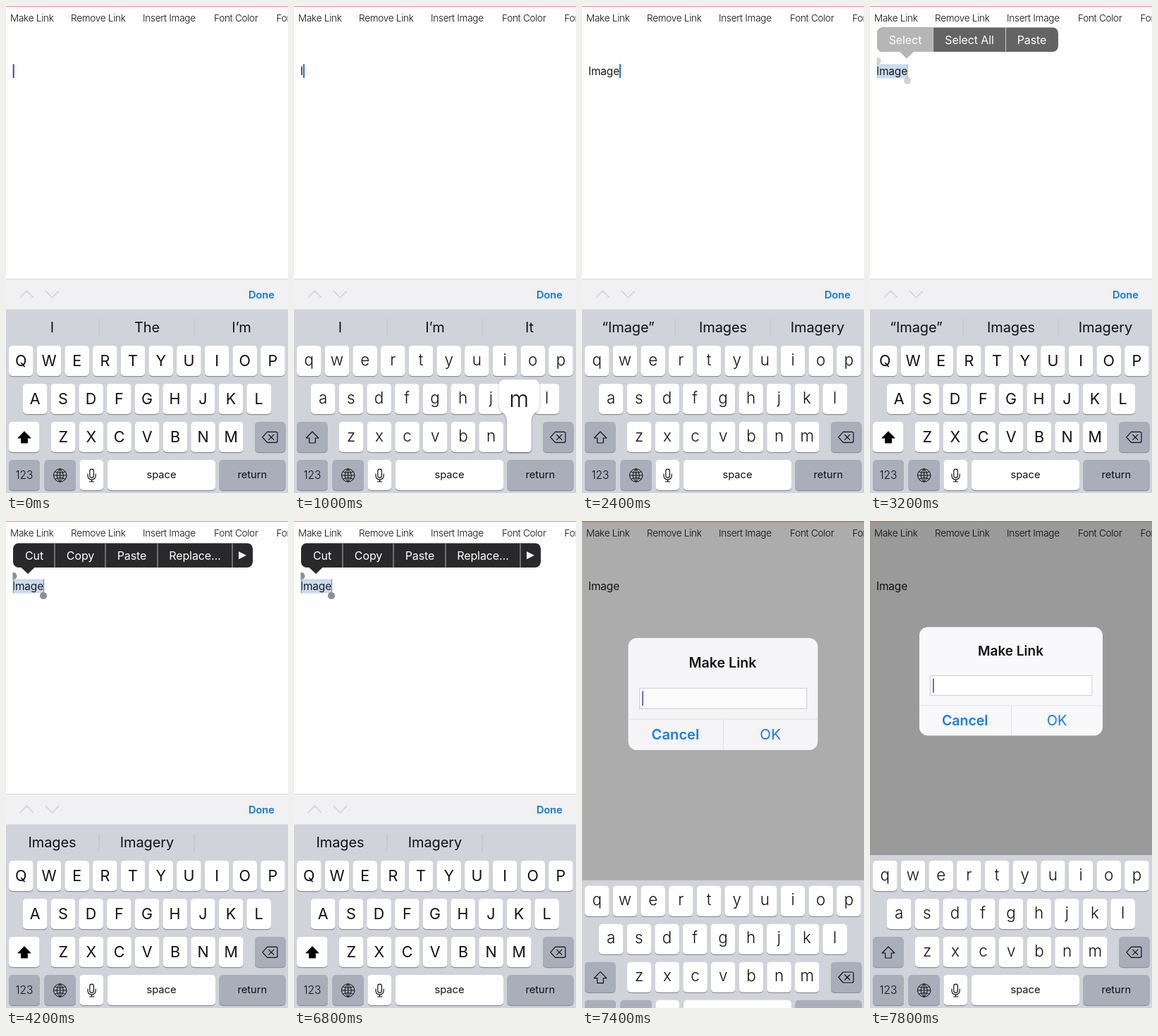
Animation, 400 px wide and 691 px high, one loop 8 s. Source, as an HTML page:

```html
<!DOCTYPE html>
<html lang="en">
<head>
<meta charset="utf-8">
<title>Editor link demo</title>
<style>
  html, body { margin: 0; width: 100%; height: 100%; overflow: hidden; background: #fefefe; }
  svg { display: block; width: 100%; height: 100%; }
  text { font-family: Inter, "Liberation Sans", sans-serif; white-space: pre; }
</style>
</head>
<body>
<svg id="stage" viewBox="0 0 400 691"></svg>
<script>
const NS = 'http://www.w3.org/2000/svg';
const LOOP = 8000, STEP = 200;
const stage = document.getElementById('stage');

function add(parent, tag, attrs = {}, text) {
  const el = document.createElementNS(NS, tag);
  for (const k in attrs) el.setAttribute(k, attrs[k]);
  if (text !== undefined) el.textContent = text;
  parent.appendChild(el);
  return el;
}
const group = (parent, attrs) => add(parent, 'g', attrs);
const rect = (parent, x, y, width, height, fill, rx = 0) =>
  add(parent, 'rect', { x, y, width, height, fill, rx });
const path = (parent, d, attrs) => add(parent, 'path', { d, fill: 'none', ...attrs });
const label = (parent, str, x, y, size, attrs = {}) =>
  add(parent, 'text', { x, y, 'font-size': size, fill: '#111', ...attrs }, str);
const centered = (parent, str, x, y, size, attrs = {}) =>
  label(parent, str, x, y, size, { 'text-anchor': 'middle', ...attrs });
const show = (el, on) => el.setAttribute('display', on ? 'inline' : 'none');
const fade = (el, a) => el.setAttribute('opacity', a);

// Value of the last [time, value] entry that has been reached.
function at(track, t) {
  let value = track[0][1];
  for (const [time, v] of track) if (t >= time) value = v;
  return value;
}

/* ---------- page ---------- */
rect(stage, 0, 0, 400, 691, '#fefefe');
[['Make Link', 6], ['Remove Link', 92], ['Insert Image', 194], ['Font Color', 295], ['Font Size', 383.5]]
  .forEach(([s, x]) => label(stage, s, x, 22, 13.6, { 'font-weight': 300, 'letter-spacing': -0.3 }));

const selection = rect(stage, 10, 82.5, 43.5, 20, '#c9daf1');
const typed = label(stage, '', 9, 98.3, 15.5, { 'letter-spacing': -0.2, fill: '#1c1c1e' });
const caret = rect(stage, 10, 82.5, 2, 19.5, '#1672f0');

const handles = group(stage, { fill: '#8f8f94' });
const clip = add(stage, 'clipPath', { id: 'edge' });
rect(clip, 9.5, 70, 60, 45, '#000');
handles.setAttribute('clip-path', 'url(#edge)');
rect(handles, 9.5, 80, 1.4, 22.5, '#8f8f94');
rect(handles, 52.8, 82.5, 1.4, 22, '#8f8f94');
add(handles, 'circle', { cx: 10.5, cy: 78, r: 5 });
add(handles, 'circle', { cx: 53, cy: 106, r: 5 });

/* ---------- callout menus ---------- */
function callout(right, top, tip, items, cuts) {
  const g = group(stage);
  const b = top + 34.5;
  path(g, `M18 ${top}H${right - 8}a8 8 0 0 1 8 8V${b - 8}a8 8 0 0 1-8 8H${tip + 9.5}L${tip} ${b + 9}L${tip - 9.5} ${b}H18a8 8 0 0 1-8-8V${top + 8}a8 8 0 0 1 8-8Z`,
    { fill: '#29292b' });
  const glow = path(g, `M18 ${top}H${cuts[0]}V${b}H${tip + 9.5}L${tip} ${b + 9}L${tip - 9.5} ${b}H18a8 8 0 0 1-8-8V${top + 8}a8 8 0 0 1 8-8Z`,
    { fill: '#9b9b9d', display: 'none' });
  cuts.forEach(x => rect(g, x - 0.5, top, 1, 34.5, '#b4b4b6'));
  items.forEach(([s, x]) => centered(g, s, x, top + 23.3, 16, { fill: '#fff', 'letter-spacing': -0.1 }));
  return { g, glow };
}
const pickMenu = callout(267, 30.5, 52, [['Select', 50], ['Select All', 141], ['Paste', 229.5]], [89.5, 192.5]);
const editMenu = callout(350, 31.5, 31,
  [['Cut', 40], ['Copy', 105.5], ['Paste', 178.5], ['Replace…', 268]], [69, 141, 215, 321]).g;
path(editMenu, 'M330 43.3L341 48.7L330 54.2Z', { fill: '#fff' });

const dim = rect(stage, 0, 0, 400, 691, '#000');

/* ---------- keyboard ---------- */
const board = group(stage);
rect(board, 0, 474, 400, 260, '#d1d3da');

const accessory = group(board);
rect(accessory, 0, 387, 400, 44, '#f1f0f2');
rect(accessory, 0, 387, 400, 1, '#d9d9dc');
rect(accessory, 0, 430.5, 400, 50, '#d1d3da');
const chevron = { stroke: '#d3d3d7', 'stroke-width': 1.7 };
path(accessory, 'M20 414L29.5 404L39 414', chevron);
path(accessory, 'M56 404L65.5 414L75 404', chevron);
label(accessory, 'Done', 344, 415, 14.5, { 'font-weight': 600, fill: '#0a7aea' });
const dividers = [132, 267].map(x => rect(accessory, x - 0.5, 444, 1, 24, '#bcbfc7'));
const pick = rect(accessory, 134, 438, 132, 36, '#e6e7eb', 5);
const hints = [65.5, 200, 334].map(x =>
  centered(accessory, '', x, 463.3, 20, { 'letter-spacing': -0.1 }));

const GREY = '#a9aeba';
function key(x, y, w, fill = '#fff') {
  rect(board, x, y + 1.2, w, 43, '#8d9098', 5);
  return rect(board, x, y, w, 43, fill, 5);
}
const caps = [], keyPos = {};
[['qwertyuiop', 21.3, 482], ['asdfghjkl', 41.2, 536], ['zxcvbnm', 81.2, 590]].forEach(([row, x0, y]) => {
  [...row].forEach((ch, i) => {
    const x = x0 + i * 39.68;
    keyPos[ch] = [x, y];
    key(x - 17.3, y, 34.6);
    caps.push({ ch, y, el: centered(board, '', x, y, 22) });
  });
});
const shiftKey = key(4, 590, 43.5);
key(353, 590, 43.5, GREY);
key(4, 644, 44, GREY);
key(54.5, 644, 44.5, GREY);
key(104.5, 644, 33.5);
key(144, 644, 153);
key(302.5, 644, 94, GREY);
const line = { stroke: '#111', 'stroke-width': 1.2, 'stroke-linejoin': 'round', 'stroke-linecap': 'round' };
const arrow = path(board, 'M26 604L34.8 613H30.3V620H21.7V613H17.2Z', line);
path(board, 'M370.5 604.3H383q2 0 2 2v11q0 2-2 2H370.5L363.8 611.8ZM372.8 608.3l7 7m0-7l-7 7', line);
centered(board, '123', 26, 671, 15.5, { 'font-weight': 300 });
path(board, 'M67.5 666a9.2 9.2 0 1 0 18.4 0a9.2 9.2 0 1 0-18.4 0H85.9M76.7 656.8V675.2M76.7 656.8c-6 5-6 13.4 0 18.4c6-5 6-13.4 0-18.4M69.3 660.8q7.4 3.4 14.8 0M69.3 671.2q7.4-3.4 14.8 0',
  { ...line, 'stroke-width': 1 });
path(board, 'M118.8 660a2.8 2.8 0 0 1 5.6 0v6.5a2.8 2.8 0 0 1-5.6 0ZM116 664v2.5a5.6 5.6 0 0 0 11.2 0V664M121.6 672v3M118.5 675h6.2', line);
centered(board, 'space', 220.5, 669.7, 14.7);
centered(board, 'return', 349.3, 669.7, 14.7);

const popup = group(board);
path(popup, 'M-20 -60H20q9 0 9 9V-25q0 7-5 11q-6.7 5-6.7 12V38q0 5-5 5H-12.3q-5 0-5-5V-2q0-7-6.7-12q-5-4-5-11V-51q0-9 9-9Z',
  { fill: '#fff', style: 'filter:drop-shadow(0 1px 1.5px rgba(0,0,0,.3))' });
const popupText = centered(popup, '', 0, -21, 32, { 'font-weight': 300 });

/* ---------- dialog ---------- */
const dialog = group(stage);
rect(dialog, 70, 150.5, 260, 154, '#f9f8fb', 12);
centered(dialog, 'Make Link', 199.5, 191.3, 19, { 'font-weight': 600 });
add(dialog, 'rect', { x: 85.5, y: 219.5, width: 229.5, height: 28, fill: '#fff', stroke: '#cfcfd4' });
rect(dialog, 89, 223.5, 1.8, 20, '#5d5be0');
rect(dialog, 70, 261.5, 260, 1, '#e3e2e6');
rect(dialog, 200, 262, 1, 42.5, '#e3e2e6');
const blue = { fill: '#0d7dfa' };
centered(dialog, 'Cancel', 134.7, 290.3, 19.5, { ...blue, 'font-weight': 600 });
centered(dialog, 'OK', 265, 290.3, 20, blue);

const topLine = rect(stage, 0, 0, 400, 1.3, '#e8a3aa');

/* ---------- timeline ---------- */
const TEXT = [[0, ''], [800, 'I'], [1200, 'Im'], [1400, 'Ima'], [1600, 'Imag'], [1800, 'Image']];
const PRESS = [[0, ''], [800, 'I'], [1000, 'm'], [1200, 'a'], [1400, 'g'], [1600, 'e'], [1800, '']];
const HINTS = [
  [0, ['I', 'The', 'I’m']],
  [800, ['I', 'I’m', 'It']],
  [1200, ['“Im”', 'I’m', 'Image']],
  [1400, ['“Ima”', 'I’m', 'Imagine']],
  [1600, ['“Imag”', 'I’m', 'Imagine']],
  [1800, ['“Image”', 'Images', 'Imagery']],
  [3400, ['Images', 'Imagery', '']]
];
const CARET = [[0, 1], [2200, 0], [2400, 1], [3000, 0]];
const HANDLES = [[0, 0], [3200, 0.4], [3400, 1], [7200, 0]];
const PICK_MENU = [[0, 0], [2800, 1], [3200, 0.72], [3400, 0]];
const EDIT_MENU = [[0, 0], [3600, 1], [7000, 0]];
const DIM = [[0, 0], [7400, 0.325], [7600, 0.395]];
const SLIDE = [[0, 0], [7200, 190], [7400, 35.7], [7600, 3], [7800, 0]];
const DIALOG = [[0, null], [7400, [1.034, 18, 0.96]], [7600, [1.004, 1.5, 1]], [7800, [1, 0, 1]]];
const LINE = [[0, '#e8a3aa'], [7400, '#f5504f'], [7600, '#d9626a']];

function setCase(upper) {
  for (const { ch, y, el } of caps) {
    el.textContent = upper ? ch.toUpperCase() : ch;
    el.setAttribute('y', y + (upper ? 29 : 27.5));
    el.setAttribute('font-size', upper ? 21.5 : 22.5);
    el.setAttribute('font-weight', upper ? 400 : 300);
  }
  shiftKey.setAttribute('fill', upper ? '#fff' : GREY);
  arrow.setAttribute('fill', upper ? '#000' : 'none');
}

function draw(t) {
  const text = at(TEXT, t);
  typed.textContent = text;
  caret.setAttribute('x', text ? 9 + typed.getComputedTextLength() : 9.7);
  caret.setAttribute('fill', t < 200 ? '#4038dc' : '#1672f0');
  show(caret, at(CARET, t));
  show(selection, t >= 3000 && t < 7200);
  fade(handles, at(HANDLES, t));

  fade(pickMenu.g, at(PICK_MENU, t));
  show(pickMenu.glow, t >= 3000);
  fade(editMenu, at(EDIT_MENU, t));

  setCase(t < 800 || (t >= 3200 && t < 7400));
  at(HINTS, t).forEach((s, i) => { hints[i].textContent = s; });
  const correcting = t >= 1200 && t < 1800;
  show(pick, correcting);
  dividers.forEach(d => show(d, !correcting));

  const ch = at(PRESS, t);
  show(popup, ch);
  if (ch) {
    const [x, y] = keyPos[ch.toLowerCase()];
    popup.setAttribute('transform', `translate(${x} ${y})`);
    popupText.textContent = ch;
  }

  show(accessory, t < 7400);
  board.setAttribute('transform', `translate(0 ${at(SLIDE, t)})`);
  fade(dim, at(DIM, t));
  topLine.setAttribute('fill', at(LINE, t));

  const pose = at(DIALOG, t);
  show(dialog, pose);
  if (pose) {
    const [scale, dy, alpha] = pose;
    dialog.setAttribute('transform', `translate(200 ${227.5 + dy}) scale(${scale}) translate(-200 -227.5)`);
    fade(dialog, alpha);
  }
}

const start = performance.now();
let shown = -1;
function tick() {
  const t = Math.floor(((performance.now() - start) % LOOP) / STEP) * STEP;
  if (t !== shown) draw(shown = t);
  requestAnimationFrame(tick);
}
tick();
</script>
</body>
</html>
```
